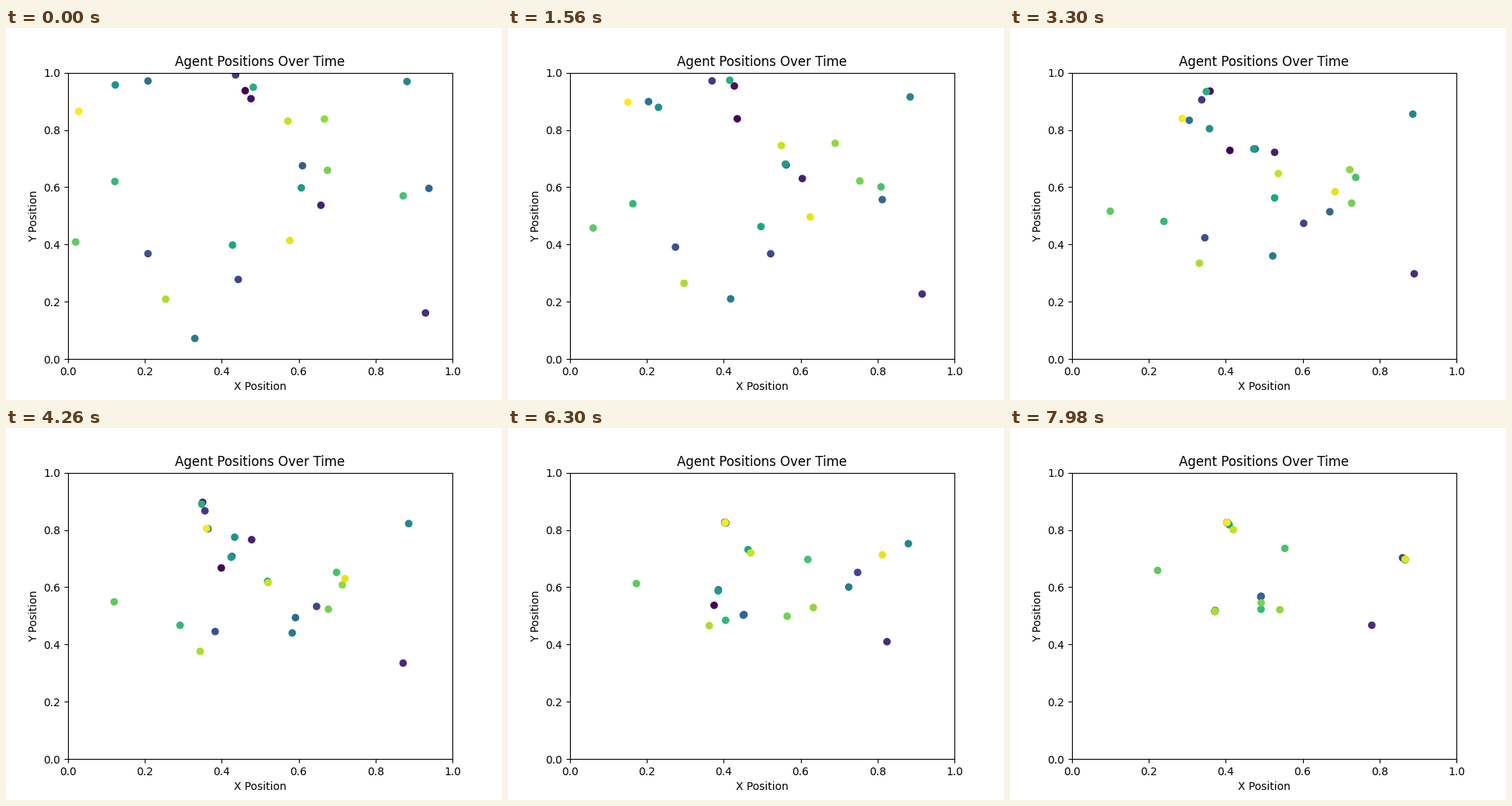
Animation of 640x480 px, one loop 8000 ms. Source, as a matplotlib script:

```python
import matplotlib.pyplot as plt
import numpy as np
from matplotlib.animation import FuncAnimation

TICK_MS = 20
TICKS_PER_STEP = 3
TICKS = 400
STEPS = (TICKS - 1) // TICKS_PER_STEP

# distance covered per step, in axis units
CRAWL, CREEP, AMBLE, WALK, STRIDE = .00207, .00243, .0026, .0027, .0028
JOG, TROT, LOPE, CANTER = .0034, .00366, .0039, .00414
HURRY, RUN, DASH = .0046, .0051, .0063

# start point, pace and index of the pursued agent
AGENTS = [
    (.461, .937, LOPE, 21), (.476, .909, AMBLE, 4), (.658, .537, CANTER, 4),
    (.930, .161, AMBLE, 17), (.436, .992, WALK, 12), (.443, .278, HURRY, 23),
    (.208, .368, WALK, 17), (.610, .675, RUN, 13), (.939, .596, RUN, 6),
    (.208, .971, CANTER, 12), (.330, .072, DASH, 11), (.882, .969, CRAWL, 3),
    (.123, .957, RUN, 2), (.607, .598, TROT, 0), (.428, .398, TROT, 2),
    (.482, .949, STRIDE, 4), (.122, .620, JOG, 10), (.872, .570, WALK, 12),
    (.020, .409, CREEP, 1), (.675, .659, JOG, 8), (.667, .838, JOG, 19),
    (.254, .209, WALK, 13), (.572, .831, JOG, 14), (.577, .414, TROT, 11),
    (.028, .865, RUN, 12),
]


def pursue(pos, pace, prey):
    """Move every agent straight towards its prey, never past it."""
    gap = pos[prey] - pos
    dist = np.hypot(gap[:, 0], gap[:, 1])
    share = np.minimum(1, pace / np.maximum(dist, 1e-9))
    return pos + gap * share[:, None]


def build_path():
    x, y, pace, prey = map(np.array, zip(*AGENTS))
    path = [np.column_stack((x, y))]
    for _ in range(STEPS):
        path.append(pursue(path[-1], pace, prey))
    return path


path = build_path()

fig, ax = plt.subplots(figsize=(6.4, 4.8), dpi=100)
dots = ax.scatter(*path[0].T, c=np.arange(len(AGENTS)), cmap="viridis")
ax.set(xlim=(0, 1), ylim=(0, 1), title="Agent Positions Over Time",
       xlabel="X Position", ylabel="Y Position")


def update(tick):
    dots.set_offsets(path[tick // TICKS_PER_STEP])
    return (dots,)


anim = FuncAnimation(fig, update, frames=TICKS, interval=TICK_MS,
                     repeat=True, repeat_delay=0)
plt.show()
```
